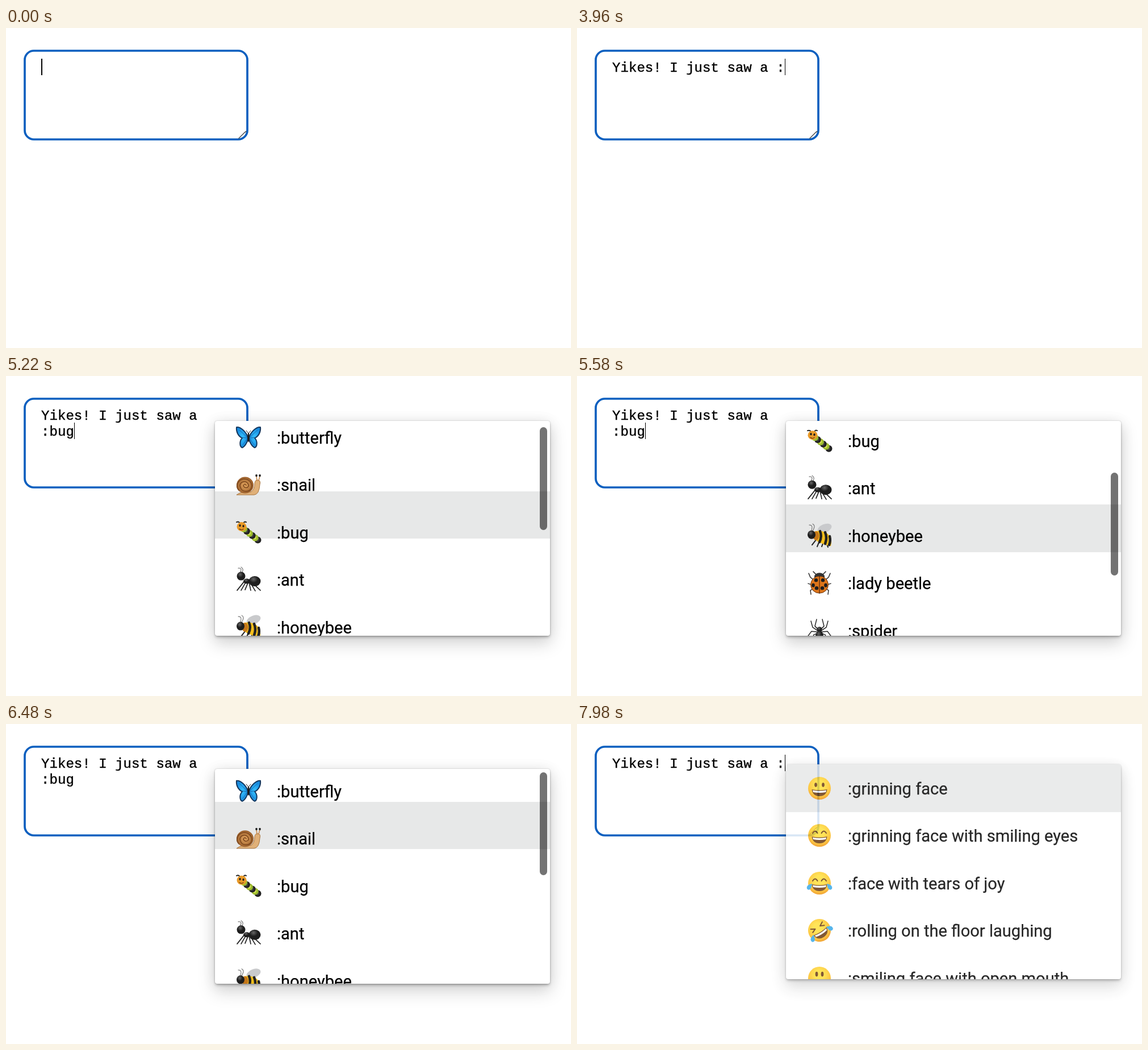
Write an HTML page that moves like this. It is 995 px wide and 563 px high and loops after 8 s.

```html
<!DOCTYPE html>
<html lang="en">
<head>
<meta charset="utf-8">
<title>Emoji picker</title>
<style>
  html, body { margin: 0; width: 100%; height: 100%; overflow: hidden; background: #fff; }
  body { position: relative; }
  body div, svg { position: absolute; box-sizing: border-box; }
  #field { left: 0; top: 0; }
  #text {
    left: 62px; top: 56.5px; white-space: pre; color: #000; -webkit-text-stroke: .4px #000;
    font: 24.1px/28px "Liberation Mono", "Courier New", monospace;
  }
  #caret { width: 1.6px; height: 29px; background: #000; }
  #popup {
    left: 367.5px; top: 79.3px; width: 590.5px; height: 378.2px; overflow: hidden;
    background: #fff; border-radius: 4px;
    box-shadow: 0 0 2px rgba(0,0,0,.25), 0 3px 5px -1px rgba(0,0,0,.33), 0 13px 30px 2px rgba(0,0,0,.15), 0 2px 25px rgba(0,0,0,.08);
  }
  #highlight { left: 0; width: 100%; height: 83.5px; background: #e7e8e8; }
  .list { left: -.5px; top: 1.3px; width: 100%; }
  .list .row {
    position: relative; height: 83.5px; padding-left: 110px; white-space: pre;
    font: 29.1px/83.5px Roboto, sans-serif; color: #000; -webkit-text-stroke: .25px #000;
  }
  .row svg { left: 35.5px; top: 16px; }
  #thumb { left: 572.2px; width: 13px; height: 181px; border-radius: 6.5px; background: rgba(0,0,0,.55); }
</style>
</head>
<body>
<svg id="field" width="440" height="210" fill="none">
  <rect x="33" y="40" width="392" height="156" rx="16" stroke="#0a5fbf" stroke-width="3.7"/>
  <path d="M409.5 194.5 420 184Q422 182 423.5 182" stroke="#444" stroke-width="1.4"/>
</svg>
<div id="text"></div>
<div id="caret"></div>
<div id="popup">
  <div id="highlight"></div>
  <div id="faces" class="list"></div>
  <div id="bugs" class="list"></div>
  <div id="thumb"></div>
</div>
<svg width="0" height="0">
  <defs>
    <radialGradient id="gold" cy=".36" r=".66"><stop offset=".3" stop-color="#ffe03a"/><stop offset=".75" stop-color="#fdbd22"/><stop offset="1" stop-color="#ec8a0c"/></radialGradient>
    <radialGradient id="shell"><stop offset=".2" stop-color="#d99c58"/><stop offset="1" stop-color="#9a5e2a"/></radialGradient>
    <radialGradient id="coal" cx=".4" cy=".3"><stop offset="0" stop-color="#666"/><stop offset=".7" stop-color="#1d1d1d"/></radialGradient>
    <radialGradient id="wing"><stop offset="0" stop-color="#35c2ff"/><stop offset="1" stop-color="#178be0"/></radialGradient>
  </defs>
</svg>
<script>
const $ = id => document.getElementById(id);
const CHAR = 14.46, LOOP = 8000, BLINK = 420;
const MESSAGE = "Yikes! I just saw a :bug", WRAP = 20;

const line = (d, color = "#1d1d1d", width = 1.6) =>
  `<path d="${d}" fill="none" stroke="${color}" stroke-width="${width}" stroke-linecap="round" stroke-linejoin="round"/>`;
const shape = (d, fill, extra = "") => `<path d="${d}" fill="${fill}" ${extra}/>`;
const oval = (x, y, rx, ry = rx, fill = "#1d1d1d", extra = "") =>
  `<ellipse cx="${x}" cy="${y}" rx="${rx}" ry="${ry}" fill="${fill}" ${extra}/>`;
const mirror = part => part + `<g transform="scale(-1 1)">${part}</g>`;

const BROWN = "#6b3a10", TEAR = "#39a9e8";
const face = parts => oval(0, 0, 20, 20, "url(#gold)") + parts;
const grin = shape("M-13.5 2Q0 5 13.5 2Q12 14 0 14T-13.5 2Z", BROWN) + shape("M-12 3.3Q0 6 12 3.3L11 6.8Q0 9-11 6.8Z", "#fff");
const arcs = mirror(line("M-12-4Q-7.5-11-3.5-4", BROWN, 2));
const tear = shape("M-13 1Q-24 3-22 10Q-18 14-14.5 8Z", TEAR);

const faces = [
  [":grinning face", face(mirror(oval(6.5, -6, 2.4, 3.8, BROWN)) + grin)],
  [":grinning face with smiling eyes", face(arcs + grin)],
  [":face with tears of joy", face(arcs + grin + mirror(tear))],
  [":rolling on the floor laughing",
    `<g transform="rotate(-32)">${face(mirror(line("M-12-10-5-6-12-3", BROWN, 2)) + grin + mirror(tear))}</g>`],
  [":smiling face with open mouth", face(mirror(oval(5, -7, 2.4, 4.4, BROWN)) + shape("M-12 3H12Q10 15 0 15T-12 3Z", BROWN))],
];

const caterpillar = [5, 4, 3, 2, 1, 0].map(i => {
  const x = -8 + i * 4.9, y = -6 + i * 3.9;
  return oval(x, y, 6, 6, i % 2 ? "#222" : "#9dbd2c") + oval(x - 1, y - 1, 3.2, 3.8, i % 2 ? "#444" : "#dbe35a");
}).join("");

const bugs = [
  [":butterfly",
    mirror(shape("M-1 0C-4-10-14-19-21-18C-22-10-18-2-11 1C-16 6-16 16-11 18C-6 16-2 8-1 3Z", "url(#wing)", 'stroke="#15385f" stroke-width="2"') +
      line("M-2 0-16-13M-2 1-12 0M-2 2-10 13", "#17609f", .8) + line("M0-7-4-12", "#222", 1)) +
    oval(0, 0, 1.8, 8)],
  [":snail",
    shape("M-21 18Q-12 11 4 13Q11 9 11-3Q12-9 17-8Q22-7 20 0Q19 17 10 18Z", "#e0b078", 'stroke="#a8743e"') +
    line("M15-7 14-15M18-7 20-15", "#c98e55", 1.8) + oval(14, -16, 1.8, 2.2) + oval(20, -16, 1.8, 2.2) +
    oval(-6, 1, 15, 14.5, "url(#shell)") +
    line("M-17 10A13 12 0 1 1 5 6A10 9 0 0 1-14 5A7.5 7 0 1 1 0 3A5 5 0 0 1-9 2Q-7-3-4 1", "#7a451c", 1.5)],
  [":bug",
    caterpillar + line("M-14-14Q-16-20-21-18M-9-15Q-8-20-4-18", "#222", 2) +
    oval(-12, -10, 8.5, 8, "#e99a28") + oval(-15, -12, 1.6, 2.2) + oval(-9, -11, 1.6, 2.2) + line("M-16-6Q-12-3-9-6", BROWN, 1.3)],
  [":ant",
    line("M-8 4-20 19M-5 5-13 19M-1 6-6 18M1 5 4 19M3 5 12 20M6 5 21 19", "#222", 1.7) +
    line("M-15-12Q-10-21-18-20M-12-12Q-7-18-13-22", "#666", 1.1) +
    oval(11, 3, 10.5, 9, "url(#coal)") + oval(-3, 3, 6, 4.5, "url(#coal)") + oval(-13, -6, 7.5, 7.5, "url(#coal)")],
  [":honeybee",
    oval(9, -13, 13, 7.5, "#c9cacc", 'transform="rotate(-22 9 -13)"') +
    line("M-6 7-13 16M0 9-4 19M7 11 4 19M12 12 15 20", "#222", 2) +
    shape("M-8-8Q8-11 17-1Q23 8 20 18Q8 16-5 9Z", "#f6bf1c") +
    line("M1-8Q5 1 0 11M10-6Q14 3 10 14M18 1Q20 9 17 16", "#222", 4.5) +
    oval(-6, 0, 5.5, 8, "#c4771a") + line("M-15-8Q-10-19-18-19M-12-9Q-6-18-12-21", "#777", 1.1) + oval(-14, -2, 7, 7.5, "url(#coal)")],
  [":lady beetle",
    mirror(line("M11-6 16-10 19-17M14 3 20 1M11 10 16 13 15 20M5-14 11-20", "#333", 1.5)) +
    oval(0, -11, 9, 7, "#333") + oval(0, 3, 15.5, 15, "#dd751a", 'stroke="#6a3511"') + line("M0-12V18", "#4a2410", 1.2) +
    mirror(oval(6, -5, 3.2) + oval(11, 4, 2.8, 3.4) + oval(5, 9, 3.2))],
  [":spider",
    mirror(line("M2-2 8-8 5-20M3 0 12-6 15-17M3 2 14 1 20 9M2 4 10 7 14 19", "#222", 1.5)) +
    oval(0, -2, 4.5, 5, "url(#coal)") + oval(0, 9, 7, 8.5, "url(#coal)")],
];

const fill = (id, items) => $(id).innerHTML = items.map(([name, art]) =>
  `<div class="row"><svg width="48" height="48" viewBox="-24 -24 48 48">${art}</svg>${name}</div>`).join("");
fill("faces", faces);
fill("bugs", bugs);

// Key strokes: time and resulting text length.
const strokes = [
  [540, 0], [1500, 1], [1620, 2], [1740, 3], [1800, 4], [1920, 5], [2220, 6], [2280, 7],
  [2460, 8], [2520, 9], [2640, 10], [2760, 11], [2820, 12], [2940, 13], [3000, 14], [3120, 15], [3240, 16],
  [3300, 17], [3420, 18], [3480, 19], [3540, 20], [3960, 21], [4140, 22], [4260, 23], [4380, 24],
  [6780, 23], [6840, 22], [6900, 21], [6960, 20], [7800, 21],
];
// Arrow keys: time, row left, row entered.
const moves = [
  [4950, 0, 1], [5100, 1, 2], [5250, 2, 3], [5400, 3, 4],
  [5920, 4, 3], [6130, 3, 2], [6300, 2, 1], [6407, 1, 0],
];
const scrollStops = [0, 0, 20, 103.5, 187];
const highlightStops = [0.2, 83.7, 146.9, 146.9, 146.9];

const ramp = (t, start, length) => Math.min(1, Math.max(0, (t - start) / length));
const easeOut = p => 1 - (1 - p) ** 2;
const follow = (stops, t) => moves.reduce((pos, [at, from, to]) =>
  pos + (stops[to] - stops[from]) * easeOut(ramp(t, at, 300)), stops[0]);

function draw(t) {
  const [last, length] = strokes.findLast(([at]) => at <= t) || strokes[0];
  const wrapped = length === MESSAGE.length;
  $("text").textContent = wrapped
    ? MESSAGE.slice(0, WRAP) + "\n" + MESSAGE.slice(WRAP)
    : MESSAGE.slice(0, length);
  const caret = $("caret").style;
  caret.left = 62 + CHAR * (wrapped ? length - WRAP : length) + "px";
  caret.top = (wrapped ? 82 : 54) + "px";
  const lit = Math.floor((t - last) / BLINK) % 2 === 0 && (t < 60 || t >= 120);
  caret.visibility = lit ? "visible" : "hidden";

  const open = ramp(t, 4050, 250) - ramp(t, 6960, 240) + ramp(t, 7830, 250);
  const popup = $("popup").style;
  popup.opacity = easeOut(open);
  popup.transform = `translateY(${-20 * (1 - open)}px)`;

  const filtered = length >= 23;
  const scroll = follow(scrollStops, t);
  $("faces").style.display = filtered ? "none" : "block";
  $("bugs").style.display = filtered ? "block" : "none";
  $("bugs").style.transform = `translateY(${-scroll}px)`;
  $("highlight").style.top = follow(highlightStops, t) + "px";
  $("thumb").style.top = 4 + scroll / 2 + "px";
  $("thumb").style.opacity = filtered ? ramp(t, 5100, 100) : 0;
}

const start = performance.now();
function tick() {
  draw((performance.now() - start) % LOOP);
  requestAnimationFrame(tick);
}
tick();
</script>
</body>
</html>
```
